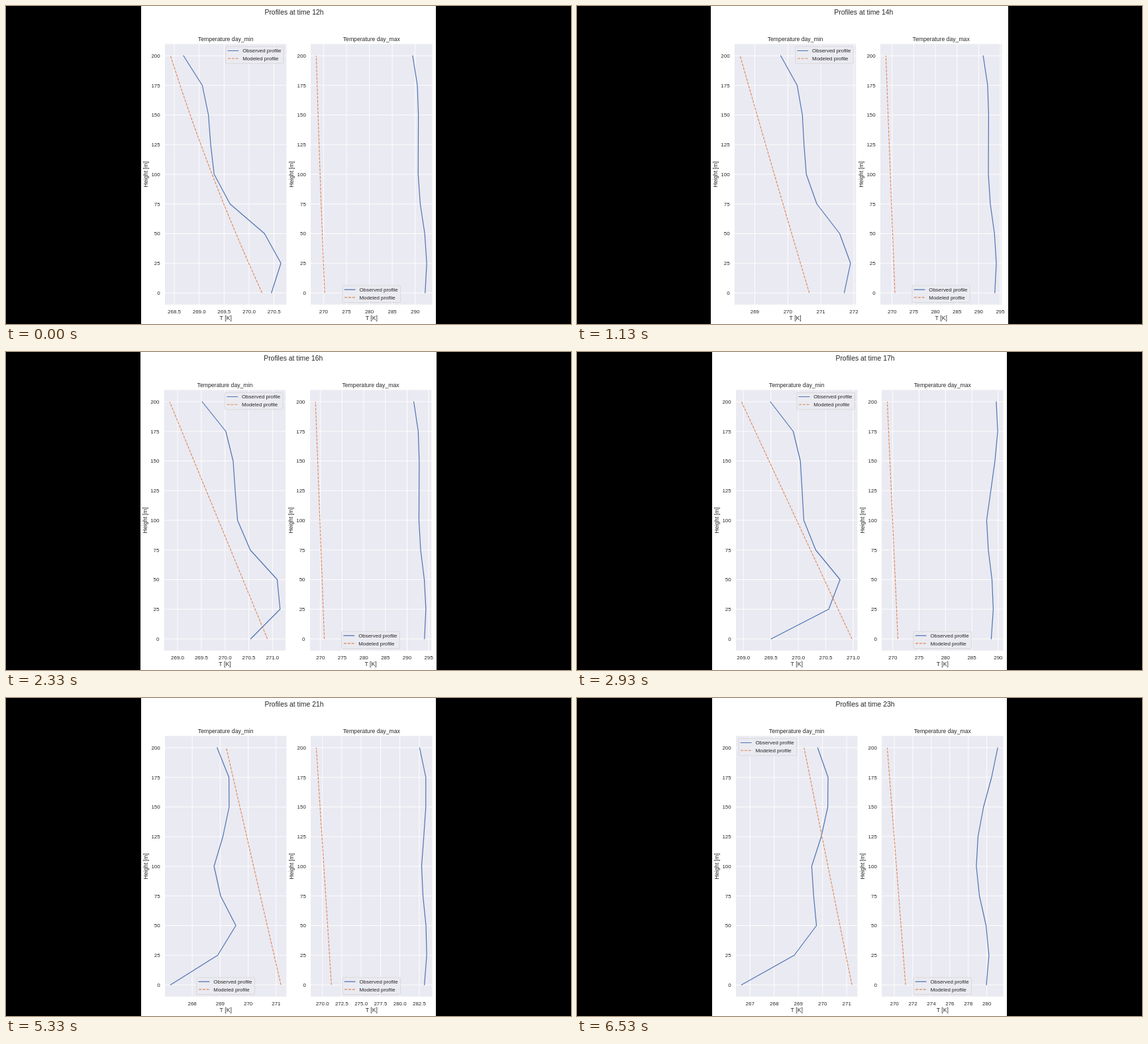
An HTML page with a canvas that plays this animation: 853 by 480 pixels, repeating every 7130 ms.

```html
<!DOCTYPE html>
<html lang="en">
<head>
<meta charset="utf-8">
<title>Temperature profiles</title>
<style>
  html, body { margin: 0; width: 100%; height: 100%; overflow: hidden; background: #000; }
  canvas { display: block; width: 853px; height: 480px; }
</style>
</head>
<body>
<canvas id="stage" width="853" height="480"></canvas>
<script>
const ctx = document.getElementById('stage').getContext('2d');
const { exp, sin, cos, abs, max, min, PI } = Math;

const LOOP = 7130, FIRST = 530, STEP = 600;
const PT = 0.723; // pixels per point
const SMALL = 11 * PT, MEDIUM = 12 * PT, LARGE = 14.4 * PT;
const INK = '#262626', PANEL = '#eaeaf2', BLUE = '#4c72b0', ORANGE = '#dd8452';
const TOP = 57.3, BOTTOM = 450.7, WIDTH = 183.4;

const levels = Array.from({ length: 9 }, (_, i) => i * 25);
const heightY = z => 433 - z * 1.79;

const bump = (x, mid, width) => exp(-(((x - mid) / width) ** 2));

function smooth(a, b, x) {
  const k = min(1, max(0, (x - a) / (b - a)));
  return k * k * (3 - 2 * k);
}

// Straight lines through [hour, value] points, held at both ends
function track(points, h) {
  const next = points.findIndex(p => p[0] >= h);
  if (next <= 0) return points[0][1];
  const [h0, v0] = points[next - 1], [h1, v1] = points[next];
  return v0 + (v1 - v0) * (h - h0) / (h1 - h0);
}

// Shared height shapes: warm layer, cooling ground, share of the upper half
const warmLayer = z => exp(-(abs((z - 22) / 47) ** 2.5));
const ground = z => exp(-((z / 36) ** 1.2));
const upper = z => max(0, (z - 100) / 100);

const baseMin = [[12, 269.26], [14, 270.52], [17, 270.12], [21, 268.83], [23, 269.65]];
const cooling = [[15, 0], [17, 0.43], [19, 0.65], [21, 0.67], [23, 1]];

function observedMin(h, z) {
  const w = upper(z);
  const bend = 0.44 + 0.24 * bump(h, 15, 1.8);
  const ripple = -0.38 * sin(max(0, h - 17) * PI / 3);
  return track(baseMin, h)
    + 1.38 * warmLayer(z)
    - 4.19 * track(cooling, h) * ground(z)
    + ripple * bump(z, 45, 25)
    - 0.12 * w - bend * w ** 5
    + 0.78 * smooth(17.5, 22, h) * sin(2 * w);
}

const baseMax = [[12, 290.6], [14, 292.2], [16, 292.7], [17, 287.78], [19, 286.24], [21, 282.79], [23, 278.83]];
const lift = [[16, 0], [17, 3], [19, 2.55], [21, 0.9], [23, 3.5]];

function observedMax(h, z) {
  const w = upper(z);
  const power = 1.65 + 0.65 * cos((h - 19) * PI / 2);
  return track(baseMax, h)
    + (2 - 1.25 * bump(h, 20, 3.2)) * warmLayer(z)
    - (0.15 + 1.3 * bump(h, 19, 1.5)) * ground(z)
    + 0.3 * w - 1.45 * w ** 5
    + track(lift, h) * w ** power;
}

// Nearly straight line that settles over the day
function modeled(h, z) {
  const k = z / 200;
  const low = 271.29 - 1.03 * exp((12 - h) / 4.2);
  const high = 269.24 - 0.815 * bump(h, 12, 4.8);
  return low + (high - low) * k - 0.34 * k * (1 - k) * exp(12 - h);
}

// Axis limits with a 5 % margin and about seven intervals
function makeAxis(observed, model) {
  const all = observed.concat(model);
  const first = min(...all), last = max(...all);
  const pad = (last - first) * 0.05, lo = first - pad, hi = last + pad;
  const step = [0.5, 1, 2, 2.5, 5, 10].find(s => s >= (hi - lo) / 7.1);
  const ticks = [];
  for (let v = Math.ceil(lo / step) * step; v <= hi; v += step) ticks.push(v);
  return { ticks, digits: step % 1 ? 1 : 0, pos: v => (v - lo) / (hi - lo) * WIDTH };
}

function text(str, x, y, size, align = 'center') {
  ctx.font = `${size}px "Liberation Sans", Arial, sans-serif`;
  ctx.textAlign = align;
  ctx.fillStyle = INK;
  ctx.fillText(str, x, y);
}

function line(points, color, width, dash = []) {
  ctx.beginPath();
  points.forEach(([x, y]) => ctx.lineTo(x, y));
  ctx.strokeStyle = color;
  ctx.lineWidth = width;
  ctx.setLineDash(dash);
  ctx.lineCap = dash.length ? 'butt' : 'round';
  ctx.lineJoin = 'round';
  ctx.stroke();
  ctx.setLineDash([]);
}

const solid = points => line(points, BLUE, 1.2);
const dashed = points => line(points, ORANGE, 1.1, [5.55 * PT, 2.4 * PT]);

function legend(x, y) {
  ctx.beginPath();
  ctx.roundRect(x, y, 87.6, 25.6, 1.6);
  ctx.fillStyle = 'rgba(234,234,242,0.8)';
  ctx.fill();
  ctx.strokeStyle = 'rgba(204,204,204,0.8)';
  ctx.lineWidth = PT;
  ctx.stroke();
  const row = (label, dy, draw) => {
    draw([[x + 3.2, y + dy], [x + 19, y + dy]]);
    text(label, x + 25.4, y + dy + 2.8, SMALL, 'left');
  };
  row('Observed profile', 6.3, solid);
  row('Modeled profile', 18, dashed);
}

function plot(left, title, axis, observed, model, place) {
  const mid = left + WIDTH / 2, px = v => left + axis.pos(v);
  ctx.fillStyle = PANEL;
  ctx.fillRect(left, TOP, WIDTH, BOTTOM - TOP);

  for (const v of axis.ticks) {
    line([[px(v), TOP], [px(v), BOTTOM]], '#fff', 0.9);
    text(v.toFixed(axis.digits), px(v), 463.7, SMALL);
  }
  for (const z of levels) {
    const y = heightY(z);
    line([[left, y], [left + WIDTH, y]], '#fff', 0.9);
    text(z, left - 7.3, y + 2.8, SMALL, 'right');
  }

  const path = values => values.map((v, i) => [px(v), heightY(levels[i])]);
  solid(path(observed));
  dashed(path(model));

  text(title, mid, 53, MEDIUM);
  text('T [K]', mid, 473.7, MEDIUM);
  ctx.save();
  ctx.translate(left - 25.8, 254);
  ctx.rotate(-PI / 2);
  text('Height [m]', 0, 0, MEDIUM);
  ctx.restore();

  if (place === 'right') legend(left + WIDTH - 91.6, 61.2);
  else if (place === 'left') legend(left + 4, 61.2);
  else legend(mid - 43.8, 421.9);
}

// Upper corner that the line tops leave free, else the lower centre
function legendPlace(axis, tops) {
  const xs = tops.map(axis.pos);
  if (max(...xs) < 90) return 'right';
  return min(...xs) > 93 ? 'left' : 'bottom';
}

function draw(hour) {
  const [low, high, model] = [observedMin, observedMax, modeled].map(f => levels.map(z => f(hour, z)));
  const axisMin = makeAxis(low, model), axisMax = makeAxis(high, model);

  // The page widens when the last tick label passes the right axis
  const over = max(0, axisMax.pos(axisMax.ticks.at(-1)) + 6.6 - WIDTH);
  const width = 445 + over, x = 426.5 - width / 2;
  const edge = Math.round(x);

  ctx.fillStyle = '#000';
  ctx.fillRect(0, 0, 853, 480);
  ctx.fillStyle = '#fff';
  ctx.fillRect(edge, 0, Math.floor(x + width) - edge, 480);

  text(`Profiles at time ${hour}h`, x + 231, 13, LARGE);
  plot(x + 36, 'Temperature day_min', axisMin, low, model, legendPlace(axisMin, [low[8], model[8]]));
  plot(x + 256.1, 'Temperature day_max', axisMax, high, model, 'bottom');
}

function frame() {
  const t = performance.now() % LOOP;
  draw(t < FIRST ? 12 : 13 + Math.floor((t - FIRST) / STEP));
  requestAnimationFrame(frame);
}
frame();
</script>
</body>
</html>
```
